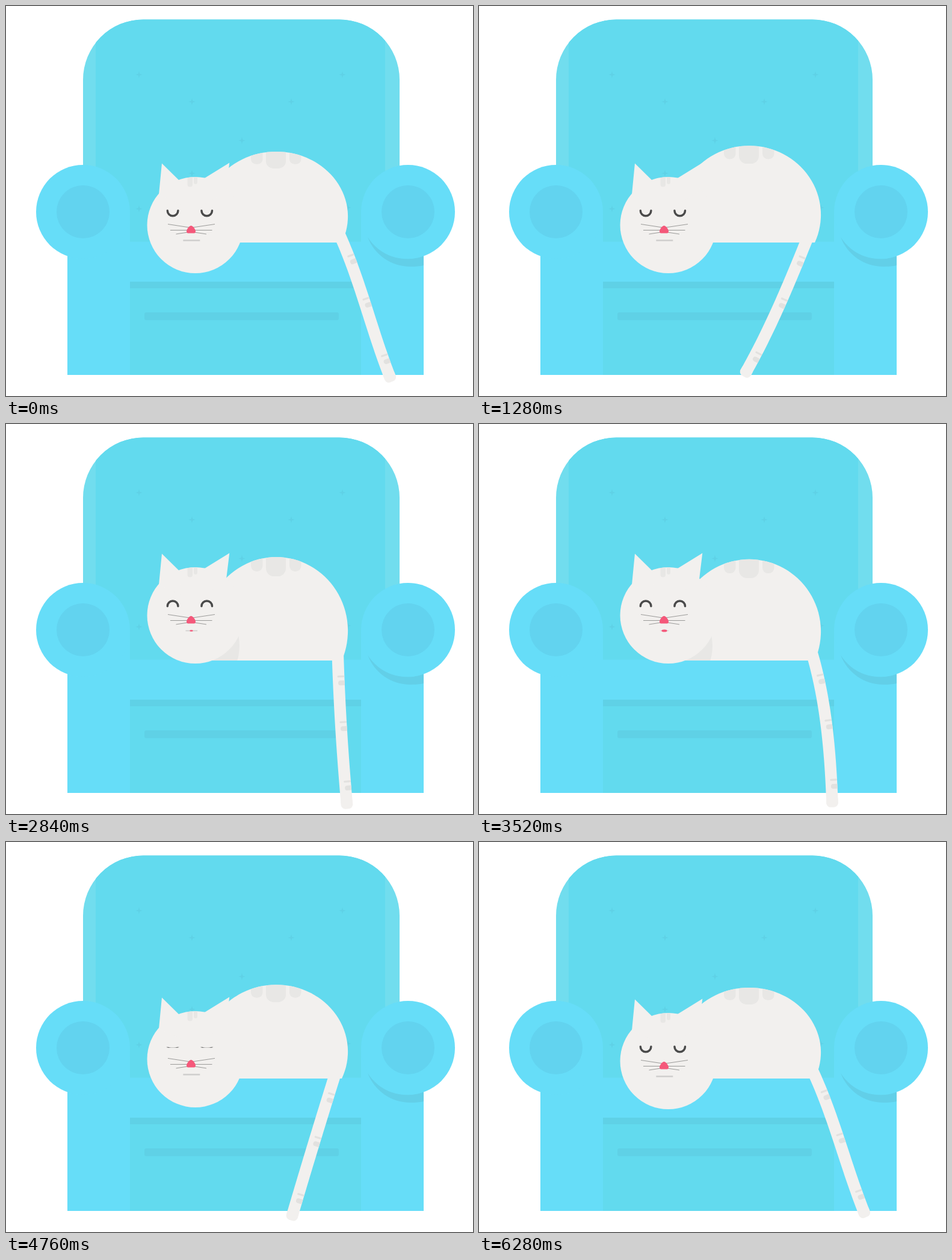
An HTML page that plays this animation: 776x648 px, repeating every 6.32 s.

```html
<!DOCTYPE html>
<html lang="en">
<head>
<meta charset="utf-8">
<title>Sleepy cat</title>
<style>
html, body { margin: 0; width: 100%; height: 100%; overflow: hidden; background: #fff; }
svg { display: block; }
.back { fill: #62daee; }
.arm { fill: #66ddf8; }
.shade { fill: #5fd1e6; }
.fur { fill: #f2f0ee; }
.mark { fill: #e8e7e5; }
.band { fill: #e2e1df; }
.line { fill: none; stroke-linecap: round; }
</style>
</head>
<body>
<svg width="776" height="648" viewBox="0 0 776 648">
  <defs>
    <clipPath id="backClip"><path d="M128 613V122.500a100 100 0 0 1 100-100H554a100 100 0 0 1 100 100V613Z"/></clipPath>
    <clipPath id="bodyClip"><path d="M340 0A119.100 119.100 0 1 1 558 0Z"/></clipPath>
    <clipPath id="headClip"><circle cx="314.500" cy="364" r="80"/></clipPath>
    <path id="star" d="M0-5.500L1.300-1.300 5.500 0 1.300 1.300 0 5.500-1.300 1.300-5.500 0-1.300-1.300Z"/>
    <path id="eye" d="M-8.800-4.400a8.800 8.800 0 0 0 17.600 0" class="line" stroke="#4a4a4a" stroke-width="3.500"/>
    <g id="bands" class="band">
      <rect x="-2" y="-7" width="11.700" height="3.200" rx="1.500"/>
      <path d="M9.700 1.500H3a4 4 0 0 0 0 8H9.700Z"/>
    </g>
  </defs>

  <g clip-path="url(#backClip)">
    <rect x="128" y="22" width="526" height="591" fill="#71ddee"/>
    <rect x="149" y="22" width="481" height="591" class="back"/>
  </g>
  <g id="stars" class="shade"></g>
  <rect x="206" y="391.500" width="384" height="67" class="arm"/>
  <rect x="206" y="458" width="384" height="155" class="back"/>
  <rect x="206" y="458" width="384" height="11" class="shade"/>
  <rect x="230" y="509" width="323" height="13" rx="3" class="shade"/>
  <g class="arm">
    <path d="M102 342H206V613H102ZM590 342H694V613H590Z"/>
    <circle cx="128" cy="342" r="78"/>
    <circle cx="668" cy="342" r="78"/>
  </g>
  <path d="M601 384C612 413 640 433 672 433Q685 433 694 431V415.500A78 78 0 0 1 601 384Z" fill="#62cfe8"/>
  <g fill="#62d3ef">
    <circle cx="128" cy="342" r="44"/>
    <circle cx="668" cy="342" r="44"/>
  </g>

  <path id="tail" fill="none" stroke="#f2f0ee" stroke-width="19.500"/>
  <rect id="tip" class="fur" x="-9.750" y="-20" width="19.500" height="20" rx="7"/>
  <use href="#bands" class="ring"/>
  <use href="#bands" class="ring"/>
  <use href="#bands" class="ring"/>

  <g id="body">
    <g clip-path="url(#bodyClip)">
      <rect x="320" y="-180" width="260" height="180" class="fur"/>
      <g class="mark">
        <rect x="407" y="-200" width="19.500" height="56" rx="9"/>
        <rect x="432" y="-200" width="33" height="64" rx="13"/>
        <rect x="471" y="-200" width="19.500" height="56" rx="9"/>
        <circle cx="308" cy="-24" r="80"/>
      </g>
    </g>
  </g>

  <g id="head">
    <g class="fur">
      <circle cx="314.500" cy="364" r="80"/>
      <path d="M254 313L259 261.500 288 290 290 330ZM330 286L371.300 260.500 365.500 308 330 330Z"/>
    </g>
    <g class="mark" clip-path="url(#headClip)">
      <rect x="301.500" y="270" width="8.500" height="30.500" rx="4"/>
      <rect x="312" y="270" width="6" height="26" rx="3"/>
    </g>
    <use href="#eye" class="eye"/>
    <use href="#eye" class="eye"/>
    <path d="M269 362.500L305 368M347 362.500L310 368M273 372.500H342.500M282.500 379L305 375.500M333 379L310 375.500" fill="none" stroke="#858483" stroke-width=".8"/>
    <path d="M307.500 365c3 0 7.500 6 7.500 9.500 0 2.500-1.500 3-3.500 3h-8c-2 0-3.500-.5-3.500-3 0-3.500 4.500-9.500 7.500-9.500Z" fill="#f4587a"/>
    <path id="mouth" fill="none" stroke="#cfcecd"/>
    <ellipse id="tongue" cx="308" cy="389.500" fill="#f4587a"/>
  </g>
</svg>
<script>
const LOOP = 6320, SWING = 6260, LENGTH = 267, STEPS = 48;
const $ = id => document.getElementById(id);
const set = (el, attrs) => { for (const k in attrs) el.setAttribute(k, attrs[k]); };
const rings = [...document.querySelectorAll('.ring')];
const eyes = [...document.querySelectorAll('.eye')];

$('stars').innerHTML = [[221, 114], [559, 114], [309, 159], [474, 159], [392, 223.5],
  [309, 278], [474, 278], [221, 337], [568, 335]]
  .map(([x, y]) => `<use href="#star" x="${x}" y="${y}"/>`).join('');

// Eased progress from a to b
const ease = (t, a, b) => {
  const p = Math.min(1, Math.max(0, (t - a) / (b - a)));
  return (1 - Math.cos(Math.PI * p)) / 2;
};
// Rises over a..b, falls over c..d
const rise = (t, a, b, c, d) => ease(t, a, b) - ease(t, c, d);

// Tail: time, then angle in degrees at root, middle and tip
const poses = [
  [0, 25, 17.8, 22], [220, 25, 21, 20], [640, 18, 9, 2], [1280, -22, -24, -30],
  [1700, -29, -24, -19], [2280, -25, -12, -3], [3100, 13, 9, 7], [3520, 17, 7, 2],
  [3840, 10, 3, -4], [4240, -3, -8.2, -18], [4800, -18, -17, -16],
  [5400, -16, -8.8, -7], [5760, -4, 4, 7]
];
const poseAt = i => {
  const n = poses.length, [time, ...angles] = poses[(i + n) % n];
  return [time + Math.floor(i / n) * SWING, ...angles];
};

function tailAngles(time) {
  const t = time % SWING;
  const i = poses.findLastIndex(p => p[0] <= t);
  const [a, b, c, d] = [-1, 0, 1, 2].map(k => poseAt(i + k));
  const h = c[0] - b[0], u = (t - b[0]) / h;
  return [1, 2, 3].map(k => {
    const m = (c[k] - a[k]) / (c[0] - a[0]) * h;
    const n = (d[k] - b[k]) / (d[0] - b[0]) * h;
    return b[k] + u * (m + u * (3 * (c[k] - b[k]) - 2 * m - n
      + u * (2 * (b[k] - c[k]) + m + n)));
  });
}

function drawTail(t) {
  const [a, b, c] = tailAngles(t);
  const angle = u => a + u * (4 * b - 3 * a - c) + u * u * 2 * (a + c - 2 * b);
  const pts = [[551, 373]];
  for (let i = 0; i < STEPS; i++) {
    const r = angle((i + .5) / STEPS) * Math.PI / 180, [x, y] = pts[i];
    pts.push([x + Math.sin(r) * LENGTH / STEPS, y + Math.cos(r) * LENGTH / STEPS]);
  }
  const place = (el, s) => {
    const f = s / LENGTH * STEPS, i = Math.min(STEPS - 1, Math.floor(f)), k = f - i;
    const [x, y] = pts[i].map((v, j) => v + (pts[i + 1][j] - v) * k);
    set(el, { transform: `translate(${x} ${y}) rotate(${-angle(s / LENGTH)})` });
  };
  set($('tail'), { d: 'M' + pts.slice(0, -1).join('L') });
  place($('tip'), LENGTH);
  [52, 128, 227].forEach((s, i) => place(rings[i], s));
}

function draw(now) {
  const t = now % LOOP;
  drawTail(t);

  const height = 151 + 21 * rise(t, 40, 2640, 2640, 5740);
  const nudge = 4 * rise(t, 1970, 2270, 2290, 2630);
  set($('body'), { transform: `translate(${nudge} 393) scale(1 ${height / 167})` });

  const lift = 46 * rise(t, 1970, 2630, 3760, 4960);
  set($('head'), { transform: `translate(0 ${-lift})` });

  const flip = 1 - 2 * rise(t, 1960, 2240, 4600, 4900);
  eyes.forEach((eye, i) =>
    set(eye, { transform: `translate(${277.1 + 56.600 * i} 344.400) scale(1 ${flip})` }));

  const open = rise(t, 2700, 2950, 3580, 3820), w = 14 - 7 * open;
  set($('mouth'), { d: `M${308.3 - w} 389.500h${2 * w}`, 'stroke-width': 2.5 - 1.5 * open });
  set($('tongue'), { rx: 4.6 * open, ry: 2 * open });
}

function tick() {
  draw(performance.now());
  requestAnimationFrame(tick);
}
tick();
</script>
</body>
</html>
```
